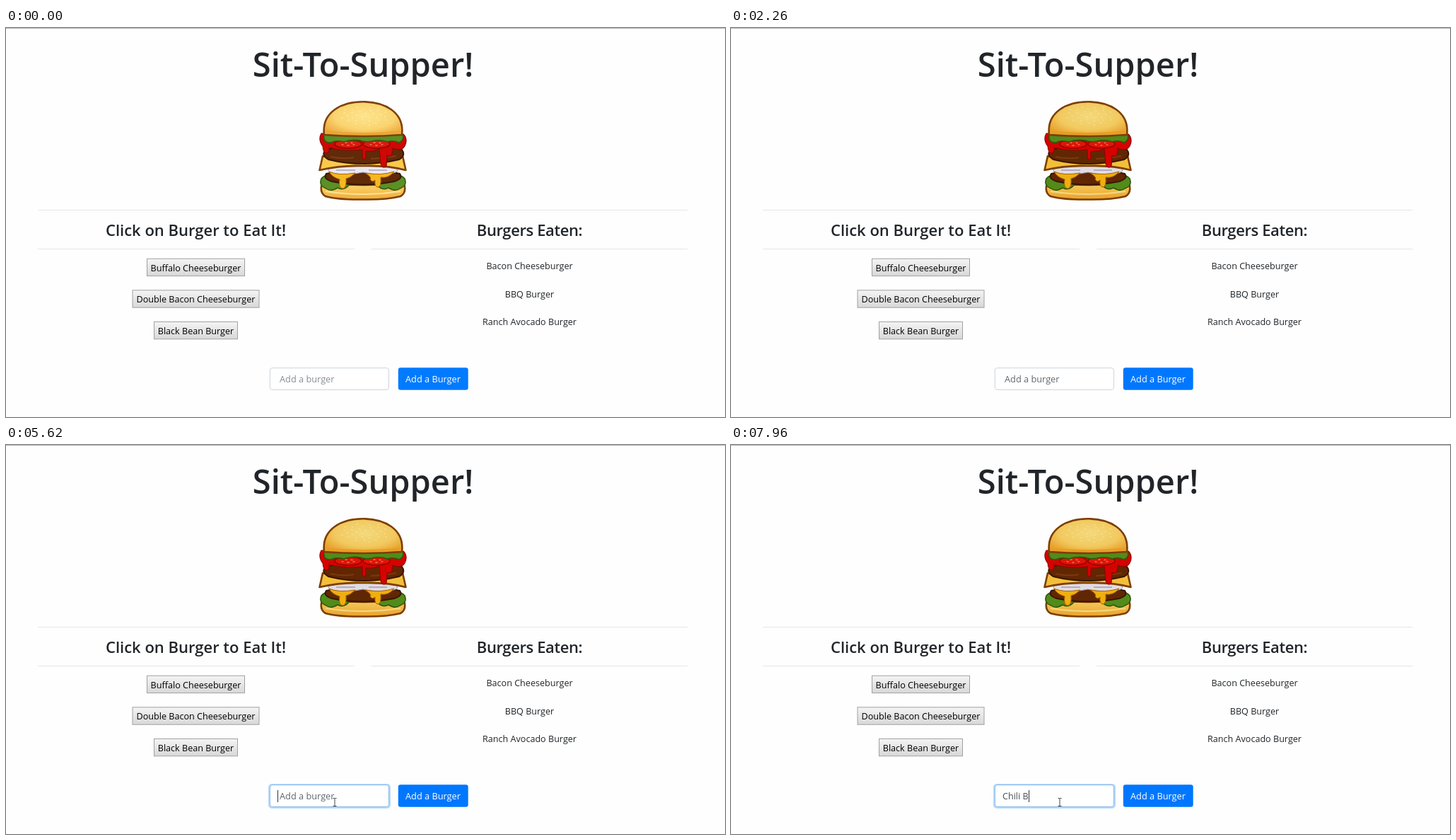
Animation, 1017 px wide and 550 px high, one loop 8 s. Source, as an HTML page:

```html
<!DOCTYPE html>
<html lang="en">
<head>
<meta charset="utf-8">
<title>Burger list</title>
<style>
  html, body { margin: 0; width: 100%; height: 100%; overflow: hidden; background: #fefefe; }
  svg { display: block; width: 1017px; height: 550px; --age: 0; }
  text { font: 12.6px "Open Sans", "Noto Sans", sans-serif; fill: #212529; white-space: pre; }
  .mid { text-anchor: middle; }
  .title { font-size: 47px; font-weight: 600; }
  .head { font-size: 22px; font-weight: 600; }
  .head.tight { letter-spacing: -.4px; }
  .tone { filter: brightness(calc(1 - .05 * var(--age))) saturate(calc(1 + .12 * var(--age))); }
  .rule { stroke: #e6e6e6; }
  .btn { fill: url(#grey); stroke: #a0a0a0; }
  .label { fill: #000; }
  .form { font-size: 12.75px; }
  #hint { fill: color-mix(in srgb, #60676e calc(var(--age) * 100%), #868e96); }
  .line { stroke: #7d4208; stroke-width: 2.6; stroke-linejoin: round; }
  .leaf { fill: #5a9026; stroke: #315c12; stroke-width: 1.6; }
  .meat { fill: #612a08; stroke: #3a1704; stroke-width: 2; }
  .sauce { fill: #ce0804; stroke: #8e0602; stroke-width: 1.2; }
  .melt { fill: #f5b822; stroke: #a96408; stroke-width: 1; }
</style>
</head>
<body>
<svg id="stage" viewBox="0 0 1017 550">
  <defs>
    <linearGradient id="grey" x2="0" y2="1">
      <stop stop-color="#f4f4f4"/><stop offset="1" stop-color="#d8d8d8"/>
    </linearGradient>
    <radialGradient id="bun" cx=".52" cy=".42" r=".64">
      <stop stop-color="#fde48c"/><stop offset=".6" stop-color="#fad470"/><stop offset="1" stop-color="#eca637"/>
    </radialGradient>
    <linearGradient id="base" x2="0" y2="1">
      <stop stop-color="#fdd770"/><stop offset="1" stop-color="#efaa3a"/>
    </linearGradient>
    <path id="lobe" class="leaf" d="M446 213Q452 206 462 211L486 221Q478 231 469 226Q459 232 453 227Q442 223 446 213Z"/>
  </defs>

  <path d="M0 .5H1017" stroke="#b4b4b4"/>
  <text class="mid title" x="505" y="68.500">Sit-To-Supper!</text>

  <g class="tone">
    <path class="line" fill="url(#base)" d="M447 220Q505 224 563 220Q567 233 558 238Q538 243 505 242.500Q470 243 452 238Q443 233 447 220Z"/>
    <path d="M452 231Q505 239 558 231" fill="none" stroke="#fde394" stroke-width="2"/>
    <use href="#lobe"/>
    <use href="#lobe" transform="matrix(-1 0 0 1 1010 0)"/>
    <path class="meat" d="M453 206Q505 194 557 206Q562 213 549 217Q505 226 461 217Q448 213 453 206Z"/>
    <path d="M458 198Q505 191 552 198Q559 204 542 206Q520 208 505 204Q480 209 466 206Q451 204 458 198Z" fill="#ece8ef" stroke="#a69daf"/>
    <path d="M467 201H494M513 201H539" stroke="#bdb5c6" stroke-width="2"/>
    <path class="melt" d="M457 203Q470 209 494 205Q487 212 481 213Q482 227 476 227Q470 226 472 214Q461 211 457 203ZM508 205Q530 209 549 203Q541 213 530 211Q531 225 526 225Q521 225 522 215Q518 219 515 214Q518 211 508 205Z"/>
    <path class="line" fill="#fac94c" d="M448 181L443.500 201Q473 194 505 195Q540 194 565.500 201L561 181Q505 200 448 181Z"/>
    <path class="meat" d="M452 172Q505 161 560 172Q566 180 556 186Q505 198 456 186Q445 179 452 172Z"/>
    <path d="M459 182Q478 186 492 183M516 185Q536 184 552 181" fill="none" stroke="#7c3c14" stroke-width="2"/>
    <path class="sauce" d="M446 149Q441 158 448 167Q449 178 454 177Q458 175 457 169Q481 175 504 172V183Q506 189 509 184V174Q520 175 528 171L530 192Q533 200 538 195L539 180Q547 185 547 170Q559 175 564 167Q569 157 562 150Z"/>
    <g fill="#da1a0c" stroke="#8e0602" stroke-width="1.500">
      <ellipse cx="484" cy="164" rx="19" ry="6"/><ellipse cx="524" cy="164" rx="19" ry="6"/>
    </g>
    <g fill="none" stroke="#ef8068" stroke-width="1.500" stroke-dasharray="3 5">
      <ellipse cx="484" cy="164" rx="9" ry="2"/><ellipse cx="524" cy="164" rx="9" ry="2"/>
    </g>
    <path class="leaf" d="M450 151Q505 147 561 151Q564 158 556 162Q547 158 540 161Q528 157 518 160Q509 162 501 159Q488 157 478 161Q466 158 460 162Q448 163 450 151Z"/>
    <path class="line" fill="url(#bun)" d="M450 151C446 118 476 104.300 505 104.300S564 118 560 151Q532 153 505 153Q476 153 450 151Z"/>
    <path d="M456 147Q505 152 554 147" fill="none" stroke="#eca637" stroke-width="3"/>
    <g id="seeds" fill="#fff2bd" opacity=".75"></g>
  </g>

  <path class="rule" d="M45 257.500H964M45 312.500H493M517 312.500H964"/>
  <text class="mid head" x="268.500" y="294">Click on Burger to Eat It!</text>
  <text class="mid head tight" x="740.500" y="294">Burgers Eaten:</text>
  <g id="lists"></g>

  <rect id="glow" x="371" y="479" width="173" height="35" rx="5" fill="#007bff" fill-opacity=".28"/>
  <rect id="field" x="373.300" y="480.700" width="168.200" height="30.800" rx="3.300" fill="#fff"/>
  <text id="hint" class="form" x="387" y="501">Add a burger</text>
  <text id="typed" x="384" y="501" style="fill:#495057"></text>
  <path id="caret" d="M.5 488V505" stroke="#333"/>
  <rect class="tone" x="554.800" y="480.300" width="98.900" height="31.500" rx="3.300" fill="#007bff"/>
  <text class="mid form" x="604" y="501" style="fill:#fff">Add a Burger</text>

  <circle id="busy" r="5" fill="none" stroke="#2f8fe0" stroke-width="3.400"/>
  <path id="beam" d="M462.500 499.500H464.500L465 500L465.500 499.500H467.500M465 500V510M462.500 510.500H467.500" fill="none" stroke="#444"/>
</svg>
<script>
const LOOP = 8000, FOCUS = 4050, BLINK = 530, TEXT_X = 384;
const $ = id => document.getElementById(id);
const NS = 'http://www.w3.org/2000/svg';

const add = (parent, tag, attrs, text = '') => {
  const node = parent.appendChild(document.createElementNS(NS, tag));
  for (const key in attrs) node.setAttribute(key, attrs[key]);
  node.textContent = text;
  return node;
};

[['Buffalo Cheeseburger', 139], ['Double Bacon Cheeseburger', 180], ['Black Bean Burger', 119]]
  .forEach(([name, width], i) => {
    const y = 326.2 + i * 44.6;
    add($('lists'), 'rect', { class: 'btn', x: 269 - width / 2, y, width: width - 1, height: 24.4 });
    add($('lists'), 'text', { class: 'mid label', x: 268.5, y: y + 17.5 }, name);
  });
['Bacon Cheeseburger', 'BBQ Burger', 'Ranch Avocado Burger'].forEach((name, i) =>
  add($('lists'), 'text', { class: 'mid', x: 740.5, y: 341 + i * 39.7 }, name));

// Sesame seeds on a loose sunflower spiral
for (let i = 1; i < 34; i++) {
  const angle = i * 2.4, r = Math.sqrt(i / 34);
  add($('seeds'), 'ellipse', { cx: 508 + 36 * r * Math.cos(angle), cy: 124 + 14 * r * Math.sin(angle), rx: 1.2, ry: .8 });
}

// [time, letters shown]
const keys = [[6250, 1], [6380, 2], [6840, 3], [7110, 4], [7500, 5], [7630, 6], [7960, 7]];
const clamp = v => Math.max(0, Math.min(1, v));
const show = (id, on) => $(id).setAttribute('visibility', on ? 'visible' : 'hidden');

function render(t) {
  $('stage').style.setProperty('--age', clamp((t - 70) / 760));

  show('busy', t >= 3450 && t < 3650);
  $('busy').setAttribute('transform', `translate(${t < 3580 ? 744 : 690} 510.5)`);
  show('beam', t >= 3650);

  const focus = clamp((t - FOCUS) / 150);
  $('glow').setAttribute('opacity', focus);
  $('field').setAttribute('stroke', focus > .5 ? '#86b7e6' : '#ced4da');

  const count = keys.reduce((n, [time, letters]) => t >= time ? letters : n, 0);
  $('typed').textContent = 'Chili B'.slice(0, count);
  show('hint', !count);
  const lit = Math.floor((t - FOCUS) / BLINK) % 2 === 0;
  show('caret', t >= FOCUS && (count || lit));
  const end = count ? $('typed').getComputedTextLength() : 0;
  $('caret').setAttribute('transform', `translate(${Math.round(TEXT_X + end)} 0)`);
}

function tick() {
  render(performance.now() % LOOP);
  requestAnimationFrame(tick);
}
tick();
</script>
</body>
</html>
```
